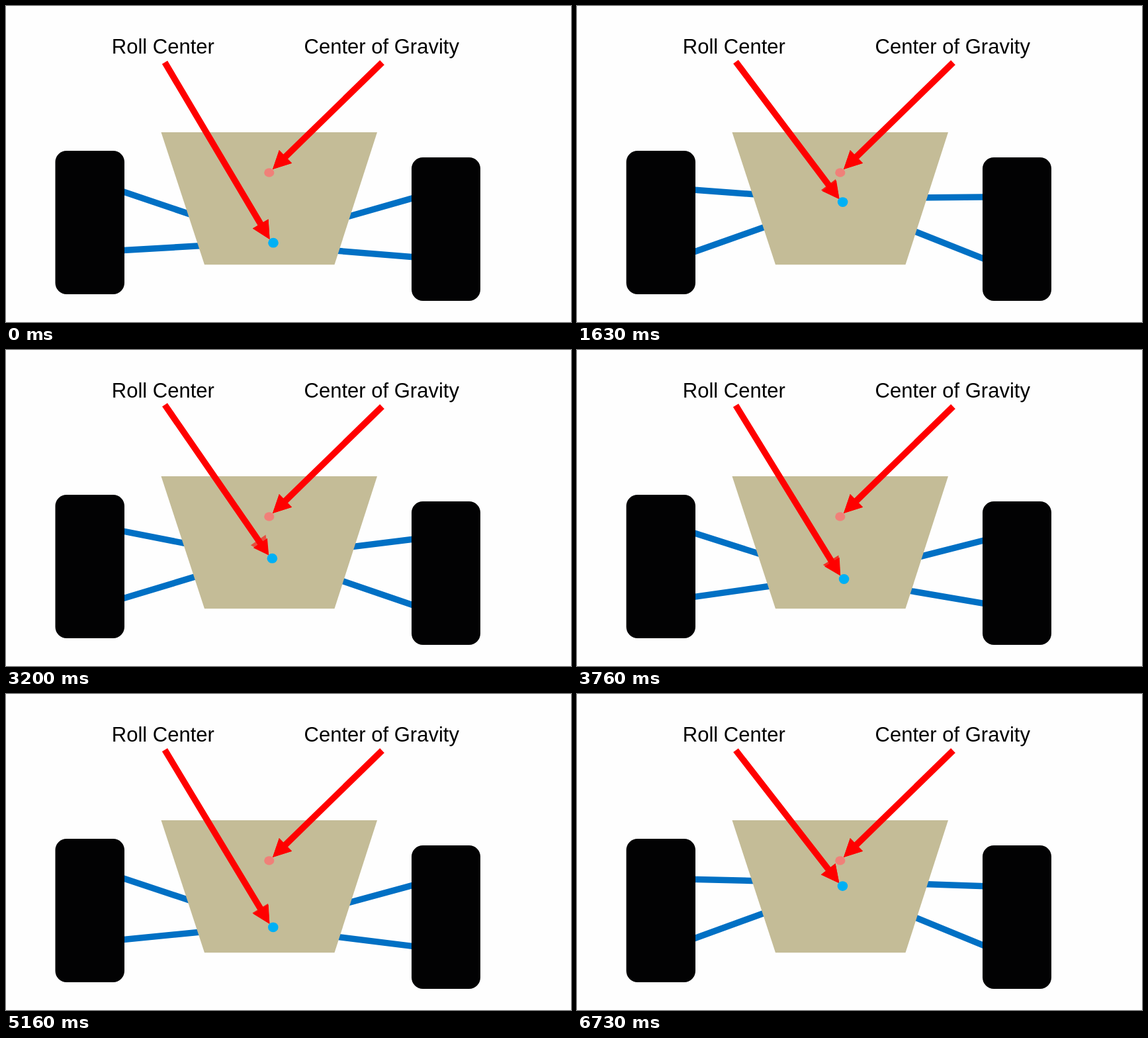
An HTML page that plays this animation: 854x478 px, repeating every 6760 ms.

```html
<!DOCTYPE html>
<html lang="en">
<head>
<meta charset="utf-8">
<title>Roll center</title>
<style>
  html, body { margin: 0; width: 100%; height: 100%; overflow: hidden; background: #fefefe; }
  svg { display: block; width: 100%; height: 100%; }
  text { font: 31px "Liberation Sans", Arial, sans-serif; fill: #000; }
  .arm { stroke: #0070c4; stroke-width: 9.5; }
  .shaft { stroke: #f00; stroke-width: 9.6; }
  .head { fill: #f00; }
</style>
</head>
<body>
<svg viewBox="0 0 854 478">
  <g id="arms"></g>
  <rect x="74.5" y="219" width="104.5" height="217" rx="17" fill="#020203"/>
  <rect x="613" y="229" width="104" height="217" rx="17" fill="#020203"/>
  <path d="M234.5 191H561L496.5 391.3H300Z" fill="#c4bc97"/>
  <ellipse cx="397.8" cy="252" rx="7.6" ry="6.8" fill="#f08079"/>
  <g id="arrows"></g>
  <ellipse id="roll" rx="7.8" ry="7.4" fill="#00b0f5"/>
  <text x="159.8" y="72">Roll Center</text>
  <text x="450.6" y="72">Center of Gravity</text>
</svg>
<script>
const LOOP = 6760, MOVE = 2050;
// start time, height before, height after (0 = low, 1 = high)
const MOVES = [[280, 0, 1], [2610, 1, 0], [4870, 0, 1]];

// each arm: two guide points as [x, y low, y high, mid-way bulge]
const ARMS = [
  [[179, 281.5, 280.5, -6.9], [270, 312.3, 282.6, -1.2]],
  [[179, 369.5, 369, 6.5], [285, 363.3, 330.4, 0.8]],
  [[613, 291.2, 290.6, -4.6], [525, 316.3, 287.4, -0.7]],
  [[613, 379.5, 379.5, 6.2], [510, 371.1, 337.3, 0.3]]
];

const $ = id => document.getElementById(id);
const lerp = (a, b, u) => a + (b - a) * u;
const bulge = u => 4 * u * (1 - u);

function add(parent, tag, cls) {
  const el = document.createElementNS("http://www.w3.org/2000/svg", tag);
  el.setAttribute("class", cls);
  return parent.appendChild(el);
}

function set(el, attrs) {
  for (const k in attrs) el.setAttribute(k, attrs[k]);
}

function makeArrow() {
  const g = $("arrows");
  return { shaft: add(g, "line", "shaft"), ghost: add(g, "path", "head"), head: add(g, "path", "head") };
}

function drawArrow(arrow, x1, y1, x2, y2, b) {
  const len = Math.hypot(x2 - x1, y2 - y1);
  const dx = (x2 - x1) / len, dy = (y2 - y1) / len;
  const wedge = (size, half) => {
    const x = x2 - dx * size, y = y2 - dy * size;
    return `M${x2} ${y2}L${x - dy * half} ${y + dx * half}L${x + dy * half} ${y - dx * half}Z`;
  };
  set(arrow.shaft, { x1, y1, x2: x2 - dx * 20, y2: y2 - dy * 20 });
  set(arrow.head, { d: wedge(27.3 - 5 * b, 13.8 - b) });
  set(arrow.ghost, { d: wedge(27.3 + b, 13.8), opacity: 1 - 0.45 * b });
}

// cubic-bezier(.33, 0, .26, 1), solved by bisection
function ease(x) {
  if (x <= 0) return 0;
  if (x >= 1) return 1;
  let lo = 0, hi = 1, s;
  for (let i = 0; i < 24; i++) {
    s = (lo + hi) / 2;
    const r = 1 - s;
    if (3 * r * r * s * 0.33 + 3 * r * s * s * 0.26 + s * s * s < x) lo = s; else hi = s;
  }
  return s * s * (3 - 2 * s);
}

function heightAt(t) {
  let u = 0;
  for (const [start, from, to] of MOVES) {
    if (t >= start) u = lerp(from, to, ease((t - start) / MOVE));
  }
  return u;
}

const arms = ARMS.map(() => add($("arms"), "line", "arm"));
const rollArrow = makeArrow();
drawArrow(makeArrow(), 568.5, 85.5, 403, 247, 0);

function draw(u) {
  const b = bulge(u);
  ARMS.forEach((guides, i) => {
    const [p, q] = guides.map(([x, low, high, k]) => [x, lerp(low, high, u) + k * b]);
    const at = k => [lerp(p[0], q[0], k), lerp(p[1], q[1], k)];
    const [x1, y1] = at(-0.3), [x2, y2] = at(1.4);
    set(arms[i], { x1, y1, x2, y2 });
  });
  drawArrow(rollArrow, 240, 85.2 - 2.5 * b, lerp(398.6, 396.4, u), lerp(353, 286, u), b);
  set($("roll"), { cx: lerp(404, 401.4, u), cy: lerp(358.2, 290.2, u) });
}

// hold each picture for one step of 30 per second
function step(t) {
  const k = Math.ceil((Math.floor(t / 10) * 10 + 10) * 3 / 100) - 1;
  return Math.floor(k * 10 / 3) * 10;
}

const begin = performance.now();
function tick() {
  draw(heightAt(step((performance.now() - begin) % LOOP)));
  requestAnimationFrame(tick);
}
tick();
</script>
</body>
</html>
```
